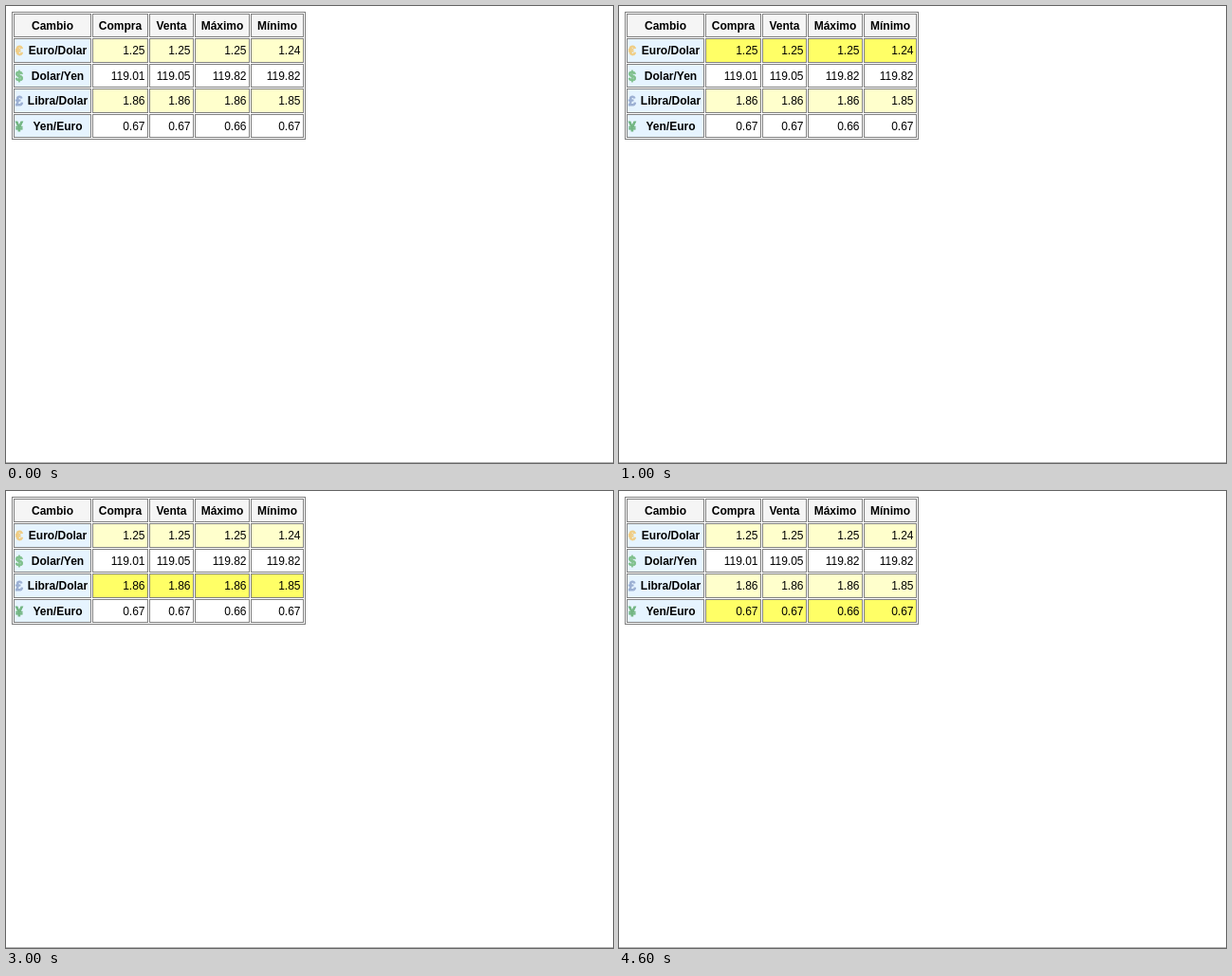
Animation, 640 px wide and 482 px high, one loop 5 s. Source, as an HTML page:

```html
<!DOCTYPE html>
<html lang="es">
<head>
<meta charset="utf-8">
<style>
  html, body { margin: 0; width: 100%; height: 100%; overflow: hidden; background: #fff; }
  svg { display: block; font: 12px "Liberation Sans", Arial, sans-serif; }
  .bold { font-weight: bold; }
  .icon { font-weight: bold; font-size: 14px; stroke-width: .8px; }
</style>
</head>
<body>
<svg id="stage" width="640" height="482" viewBox="0 0 640 482"></svg>
<script>
const stage = document.getElementById("stage");
const columns = [[8, 89], [91, 149], [151, 197], [199, 256], [258, 313]];
const headings = ["Cambio", "Compra", "Venta", "Máximo", "Mínimo"];
const rates = [
  { icon: "€", color: "#f0cd84", name: "Euro/Dolar", values: ["1.25", "1.25", "1.25", "1.24"] },
  { icon: "$", color: "#7fc08c", name: "Dolar/Yen", values: ["119.01", "119.05", "119.82", "119.82"] },
  { icon: "£", color: "#9bafd2", name: "Libra/Dolar", values: ["1.86", "1.86", "1.86", "1.85"] },
  { icon: "¥", color: "#72b582", name: "Yen/Euro", values: ["0.67", "0.67", "0.66", "0.67"] }
];

function add(tag, attrs, content = "") {
  const node = document.createElementNS("http://www.w3.org/2000/svg", tag);
  for (const key in attrs) node.setAttribute(key, attrs[key]);
  node.textContent = content;
  stage.append(node);
  return node;
}

function box(left, top, right, bottom, fill) {
  return add("rect", {
    x: left + .5, y: top + .5, width: right - left, height: bottom - top, fill, stroke: "#808080"
  });
}

function label(content, x, y, anchor, attrs = {}) {
  add("text", { x, y, "text-anchor": anchor, ...attrs }, content);
}

const rowTop = row => 8 + Math.floor(row * 26.5);
const baseline = row => rowTop(row) + 17;
const cell = (row, [left, right], fill) => box(left, rowTop(row), right, rowTop(row + 1) - 2, fill);
const restingFill = index => index % 2 ? "#ffffff" : "#ffffcc";

box(6, 6, 315, 140, "#fff");
headings.forEach((heading, i) => {
  const [left, right] = columns[i];
  cell(0, columns[i], "#f5f5f5");
  label(heading, (left + right + 1) / 2, baseline(0), "middle", { class: "bold" });
});

const rateCells = rates.map(({ icon, color, name, values }, index) => {
  const row = index + 1, y = baseline(row);
  cell(row, columns[0], "#e6f4ff");
  label(icon, 14, y + 1, "middle", { class: "icon", fill: color, stroke: color });
  label(name, 54.5, y, "middle", { class: "bold" });
  return values.map((value, i) => {
    const column = columns[i + 1];
    const rect = cell(row, column, restingFill(index));
    label(value, column[1] - 2.5, y, "end");
    return rect;
  });
});

add("rect", { x: 0, y: 481, width: 640, height: 1, fill: "#b4b4b4" });

function draw(time) {
  const active = Math.floor(time % 5000 / 1000) - 1;
  rateCells.forEach((cells, index) => {
    const fill = index === active ? "#ffff66" : restingFill(index);
    cells.forEach(rect => rect.setAttribute("fill", fill));
  });
}

function tick(now) {
  draw(now);
  requestAnimationFrame(tick);
}
draw(0);
requestAnimationFrame(tick);
</script>
</body>
</html>
```
